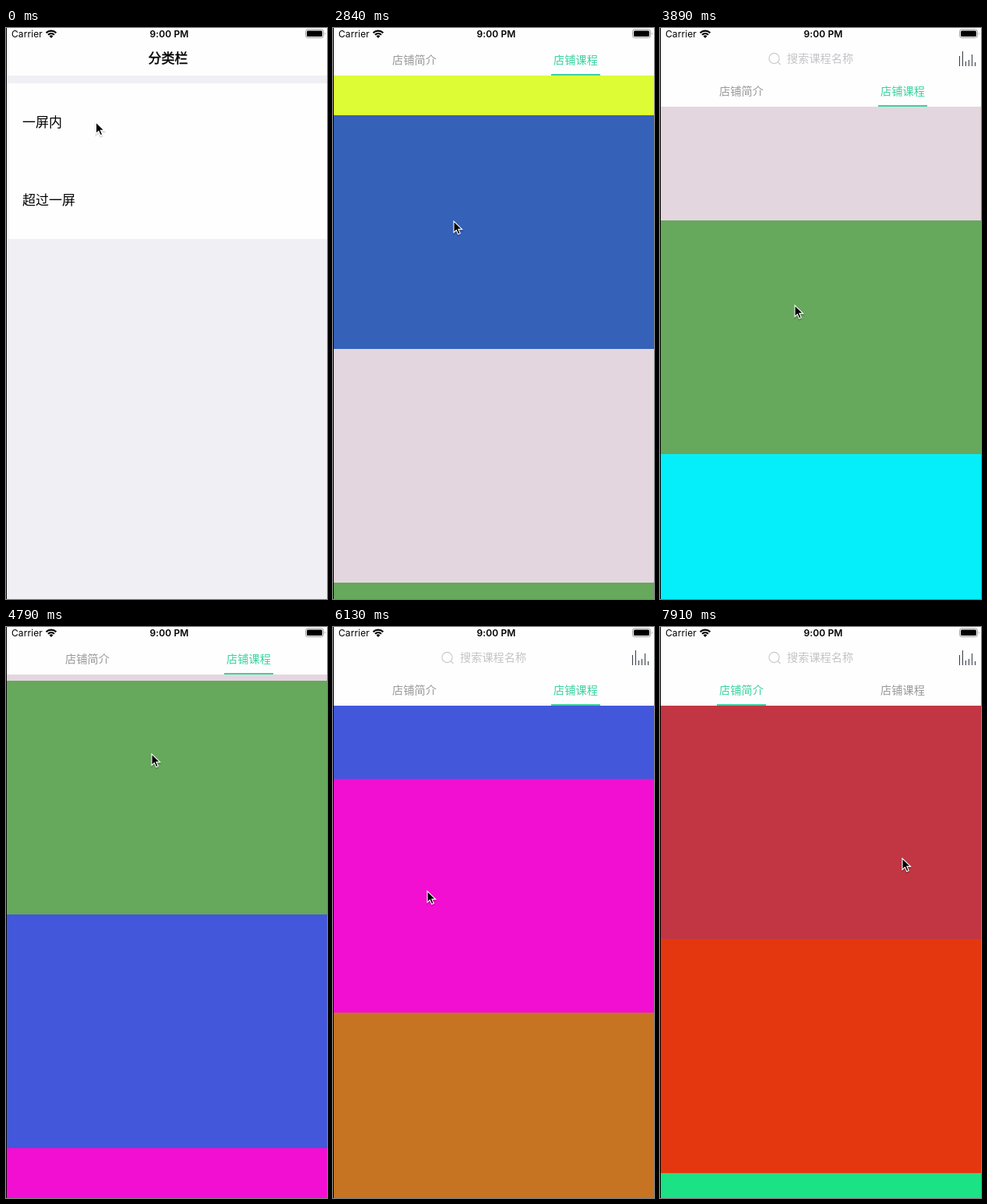
An HTML page for the animation above (8000 ms loop, 412 px wide and 733 px high).

```html
<!DOCTYPE html>
<html lang="zh">
<head>
<meta charset="utf-8">
<style>
  html, body { margin: 0; width: 100%; height: 100%; overflow: hidden; background: #fefefe; }
  svg { display: block; width: 412px; height: 733px; }
  text { font-family: "Noto Sans CJK SC", "Noto Sans CJK", sans-serif; }
  .status text { font: 12px Inter, sans-serif; letter-spacing: .1px; }
  .mid { text-anchor: middle; }
  .light { font-size: 14.2px; font-weight: 300; }
</style>
</head>
<body>
<svg viewBox="0 0 412 733">
  <g id="list">
    <rect x="1" width="414" height="733" fill="#efeff4"/>
    <path d="M1 0h414v61h-414zM1 71h414v200h-414z" fill="#fefefe"/>
    <g font-size="17">
      <text class="mid" x="208" y="45" stroke="#000" stroke-width=".45">分类栏</text>
      <text x="21" y="127">一屏内</text>
      <text x="21" y="227">超过一屏</text>
    </g>
    <rect id="dim" x="1" width="414" height="733"/>
  </g>
  <g id="shop">
    <rect x="1" width="414" height="733" fill="#fefefe"/>
    <g id="intro"></g>
    <g id="courses"></g>
    <rect id="headerBack" x="1" width="414" fill="#fefefe"/>
    <g id="header">
      <g id="search">
        <g fill="none" stroke="#c8c8cc" stroke-width="1.1">
          <circle cx="146.5" cy="39" r="6.6"/><path d="M151.5 44l3 3"/>
        </g>
        <text class="light" x="163" y="44" fill="#c4c4c8">搜索课程名称</text>
        <path d="M384.5 36V49M388.5 30V49M392.5 43V49M396.5 41V49M400.5 34V49M404.5 44V49" stroke="#333a44"/>
      </g>
      <g class="mid light">
        <text id="tab0" x="104.5" y="86">店铺简介</text>
        <text id="tab1" x="311.5" y="86">店铺课程</text>
      </g>
      <rect id="marker" y="99" width="63" height="2" fill="#3ad2a0"/>
    </g>
  </g>
  <g class="status">
    <text x="7" y="12">Carrier</text>
    <text class="mid" x="209.5" y="12" style="font-weight:600">9:00 PM</text>
    <path d="M51.6 6.2a9.3 9.3 0 0 1 12.8 0M54 8.8a5.8 5.8 0 0 1 8 0" fill="none" stroke="#000" stroke-width="2.2"/>
    <path d="M58 13l-2.4-2.5a3.4 3.4 0 0 1 4.8 0z"/>
    <rect x="384.5" y="2" width="23" height="10.5" rx="2.8" fill="none" stroke="#999"/>
    <rect x="386" y="3.5" width="20" height="7.5" rx="1.6"/>
    <path d="M409 5.5q1.6 1.7 0 3.5z" fill="#999"/>
  </g>
  <g id="cursor">
    <path d="M0 2V16.5L3.4 13.4L5.7 18.8L8.2 17.7L5.9 12.4H10.6Z" opacity=".12" stroke="#000" stroke-width="2"/>
    <path d="M0 0V14.5L3.4 11.4L5.7 16.8L8.2 15.7L5.9 10.4H10.6Z" stroke="#fff" stroke-width="1.1"/>
  </g>
  <rect width="1" height="733"/>
</svg>
<script>
const LOOP = 8000, CELL = 300, PAGE = 414, TOP = 101, COLLAPSE = 40;
const $ = id => document.getElementById(id);

const introColors = ['#c13642', '#e5370f', '#1ce286'];
const courseColors = ['#defc35', '#3561b8', '#e4d6de', '#66a85c', '#05effa', '#f20fd1', '#c67422'];
const RECYCLED = { cell: 4, color: '#4357da' };

// Each scroll eases from the previous resting place to a new one.
const scrolls = [
  { start: 2390, end: 3544, to: -755 },
  { start: 3544, end: 4454, to: -440 },
  { start: 4454, end: 5201, to: -1360 },
  { start: 5827, end: 6870, to: -1090 }
];

// Places where the pointer turns: time, x, y.
const pointerStops = [
  [150, 115, 123], [1340, 115, 123], [1790, 276, 269], [2390, 140, 390],
  [2840, 155, 248], [3890, 173, 356], [4340, 184, 400], [4790, 187, 163],
  [6130, 121, 339], [7020, 112, 315], [7910, 311, 297]
];

const clamp = k => Math.min(1, Math.max(0, k));
const mix = (a, b, k) => a + (b - a) * k;

function ease(t, start, end) {
  const k = clamp((t - start) / (end - start));
  return k * k * (3 - 2 * k);
}

function set(node, attrs) {
  for (const name in attrs) node.setAttribute(name, attrs[name]);
}

function move(node, x, y) {
  set(node, { transform: `translate(${x} ${y})` });
}

function addCells(parent, colors) {
  return colors.map((fill, i) => {
    const cell = document.createElementNS('http://www.w3.org/2000/svg', 'rect');
    set(cell, { x: 1, y: i * CELL, width: PAGE, height: CELL, fill });
    return parent.appendChild(cell);
  });
}

function scrollAt(t) {
  return Math.round(scrolls.reduce((y, s) => mix(y, s.to, ease(t, s.start, s.end)), TOP));
}

// Scrolling up hides the search row, scrolling down brings it back.
function collapseAt(t) {
  return scrolls.reduce((k, s, i) => mix(k, 1 - i % 2, ease(t, s.start, s.start + 280)), 0);
}

function pointerAt(t) {
  if (t < 150) return [115.5, 121];
  return pointerStops.reduce((place, [time, ...next], i) => {
    const k = i ? ease(t, pointerStops[i - 1][0], time) : 1;
    return next.map((v, axis) => mix(place[axis], v, k));
  }, [0, 0]);
}

// The picture advances in steps of roughly 150 ms.
function stepTime(t) {
  if (t < 150) return 0;
  if (t < 1040) return 150;
  const [start, step] = t < 5240 ? [1040, 150] : [5240, 148.3];
  return start + Math.floor((t - start) / step) * step;
}

addCells($('intro'), introColors);
const courseCells = addCells($('courses'), courseColors);

function draw(t) {
  const push = 1 - (1 - clamp((t - 950) / 540)) ** 3;
  move($('list'), -push * PAGE * .3, 0);
  set($('dim'), { opacity: push * .1 });
  move($('shop'), (1 - push) * PAGE, 0);

  const page = ease(t, 1790, 2390) - ease(t, 7020, 7770);
  move($('intro'), -page * PAGE, TOP);
  move($('courses'), (1 - page) * PAGE, scrollAt(t));
  set(courseCells[RECYCLED.cell], {
    fill: t < scrolls[2].start ? courseColors[RECYCLED.cell] : RECYCLED.color
  });

  const hidden = collapseAt(t);
  set($('headerBack'), { height: TOP - COLLAPSE * hidden });
  move($('header'), 0, -COLLAPSE * hidden);
  set($('search'), { opacity: clamp(1 - 1.6 * hidden) });
  set($('marker'), { x: 73 + page * PAGE / 2 });
  [0, 1].forEach(i => set($('tab' + i), {
    fill: Math.round(page) === i ? '#3ad2a0' : '#999'
  }));

  move($('cursor'), ...pointerAt(t));
}

function tick(now) {
  draw(stepTime(now % LOOP));
  requestAnimationFrame(tick);
}
draw(0);
requestAnimationFrame(tick);
</script>
</body>
</html>
```
